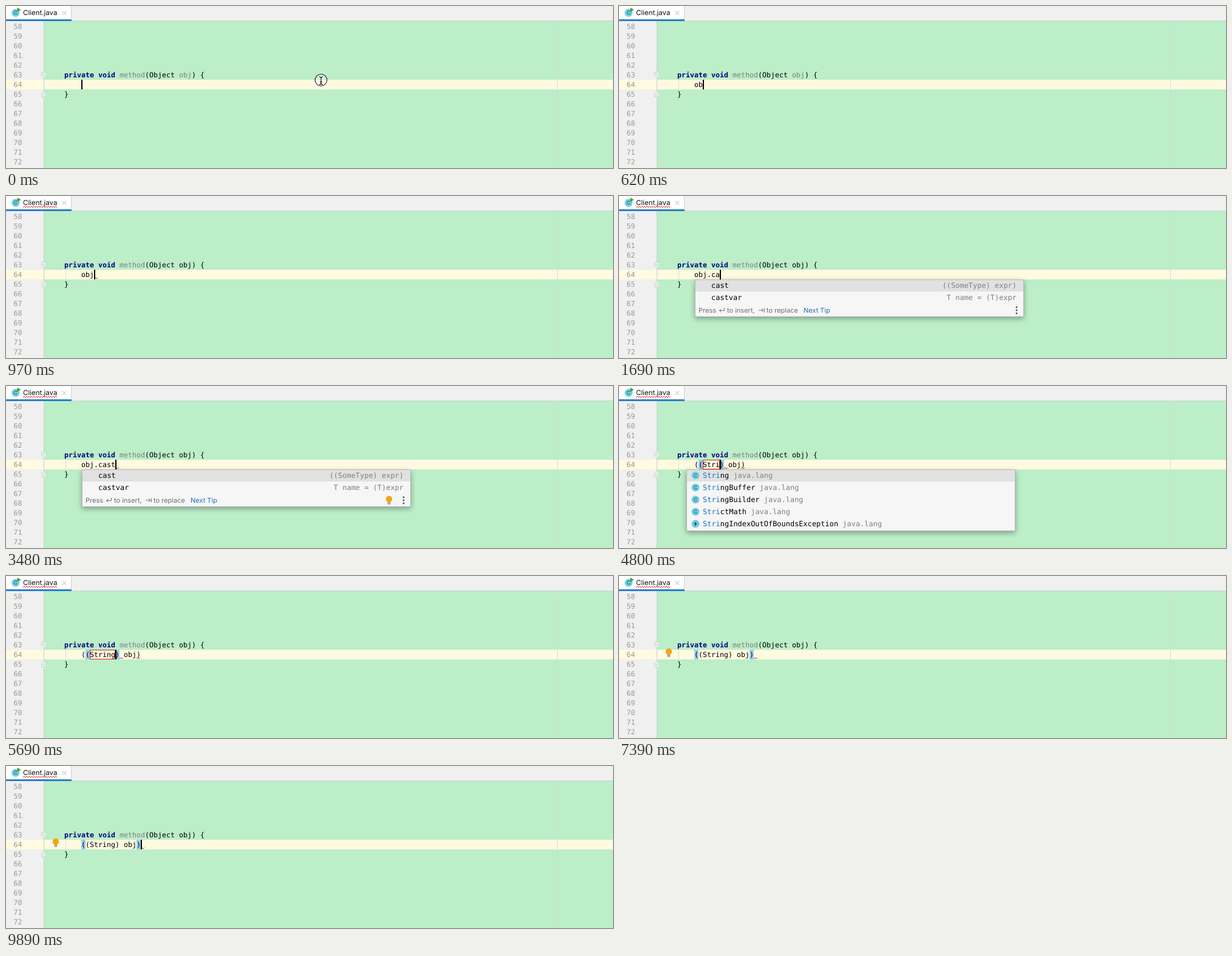
An HTML page for the animation above (9.99 s loop, 1000x268 px).

```html
<!DOCTYPE html>
<html lang="en">
<head>
<meta charset="utf-8">
<title>Cast completion</title>
<style>
html, body { margin: 0; width: 100%; height: 100%; overflow: hidden; background: #bceec8; }
svg { display: block; width: 1000px; height: 268px; }
text { white-space: pre; text-rendering: geometricPrecision; }
.code { font: 11.63px "DejaVu Sans Mono", monospace; }
.item { font: 11.96px "DejaVu Sans Mono", monospace; }
.ui { font-family: Inter, "Open Sans", sans-serif; }
.kw { font-weight: bold; fill: #000080; }
.dim { fill: #808080; }
.hit { fill: #1a6fc0; }
.wave { fill: none; stroke: #e0231c; stroke-width: 1; }
.popup { filter: drop-shadow(0 3px 4px rgba(0, 0, 0, .34)); }
</style>
</head>
<body>
<svg viewBox="0 0 1000 268" xmlns="http://www.w3.org/2000/svg">
  <g id="base"></g>
  <g id="live"></g>
</svg>
<script>
const LOOP = 9990, X0 = 124, CH = 7, TOP = 122, ROW = 16;
const col = c => X0 + c * CH;

const rect = (x, y, w, h, fill, more = '') =>
  `<rect x="${x}" y="${y}" width="${w}" height="${h}" fill="${fill}" ${more}/>`;
const text = (x, y, s, cls = 'code', more = '') =>
  `<text x="${x}" y="${y}" class="${cls}" ${more}>${s}</text>`;
const span = (cls, s) => `<tspan class="${cls}">${s}</tspan>`;
const path = (d, stroke, more = '') => `<path d="${d}" fill="none" stroke="${stroke}" ${more}/>`;

function wave(x, y, w) {
  let d = `M${x} ${y + 2}`;
  for (let i = 2, up = true; i <= w; i += 2, up = !up) d += `L${x + i} ${up ? y : y + 2}`;
  return `<path class="wave" d="${d}"/>`;
}

function bulb(x, y) {
  return `<circle cx="${x}" cy="${y - 1.5}" r="5.2" fill="#f4a50f"/>` +
    rect(x - 2.5, y + 2, 5, 2, '#f4a50f') +
    path(`M${x - 2.5} ${y + 4.7}h5M${x - 2.5} ${y + 6.6}h5`, '#6b6b6b');
}

// Round badge in front of a class, exception, method or parameter
function badge(kind, x, y) {
  const fill = { c: '#6fcfe6', e: '#6fcfe6', m: '#f4a6b0', p: '#f5b878' }[kind];
  const dot = `<circle cx="${x}" cy="${y}" r="6.5" fill="${fill}"/>`;
  if (kind === 'e')
    return dot + `<path d="M${x + 1.5} ${y - 4.5}l-4.5 5h2.5l-1 4 4.500-5h-2.500z" fill="#31434a"/>`;
  return dot + text(x, y + 3.1, kind === 'c' ? 'C' : kind, 'ui',
    'font-size="8.5" text-anchor="middle" fill="#31434a"');
}

function popup({ x, rows, hit = 0, tip, lamp, bar = 0 }) {
  const w = 542, h = rows.length * 20 + (tip ? 22 : 2), y = 138;
  let s = `<g class="popup">${rect(x, y, w, h, '#f6f6f6', 'rx="1.5"')}</g>` +
    rect(x + .5, y + .5, w - 1, h - 1, '#f6f6f6', 'stroke="#b9bcb9"') +
    rect(x + 1, y + 1, w - 2, 19, '#e1e1e1');
  rows.forEach((row, i) => {
    const [kind, name, tail = '', right = ''] = row.split('|'), cy = y + 10 + i * 20;
    if (kind) s += badge(kind, x + 15, cy);
    s += text(x + 27, cy + 4, span('hit', name.slice(0, hit)) + name.slice(hit) +
      span('dim', (kind === 'c' || kind === 'e' ? ' ' : '') + tail), 'item');
    s += text(x + 530, cy + 4, right, 'item dim', 'text-anchor="end"');
  });
  if (tip) {
    const b = y + h - 7, g = 'fill="#6e6e6e" font-size="11"';
    s += text(x + 6, b, 'Press', 'ui', g) + text(x + 53, b, 'to insert,', 'ui', g) +
      text(x + 118, b, 'to replace', 'ui', g) +
      text(x + 179, b, 'Next Tip', 'ui', 'fill="#1f6fb8" font-size="11"') +
      path(`M${x + 48.5} ${b - 8}v4.500h-8m3-3l-3 3 3 3` +
        `M${x + 105} ${b - 4}h8m-3-3l3 3-3 3M${x + 114.5} ${b - 7.5}v7`, '#6e6e6e');
    for (const d of [-5, 0, 5]) s += `<circle cx="${x + 530}" cy="${b - 4 + d}" r="1.5" fill="#555"/>`;
    if (lamp) s += bulb(x + 506, b - 4.5);
  }
  if (bar) s += rect(x + w - 9, 140, 7, 26, '#777', `rx="3.5" opacity="${bar}"`);
  return s;
}

function pointer([x, y]) {
  const beam = `M${x - 3} ${y - 5.5}q3 0 3 2.500v8q0 2.500-3 2.500M${x + 3} ${y - 5.5}q-3 0-3 2.500v8q0 2.500 3 2.500M${x - 2} ${y + 3}h4`;
  return `<circle cx="${x}" cy="${y}" r="9.8" fill="#fff" fill-opacity=".3" stroke="#222" stroke-width="1.1"/>` +
    path(beam, '#fff', 'stroke-width="2.6"') + path(beam, '#111', 'stroke-width="1.2"');
}

function drawBase() {
  let s = rect(0, 0, 1000, 25, '#f0f0f0') + rect(0, 24, 1000, 1, '#d2d2d2') +
    rect(0, 0, 107, 24, '#fff') + rect(107, 0, 1, 24, '#d2d2d2') + rect(0, 22, 108, 3, '#2b7fc9') +
    badge('c', 15.8, 11.3) + '<path d="M18.500 2.500l6 3.700-6 3.700z" fill="#4aa02c"/>' +
    text(28, 15.3, 'Client.java', 'ui', 'font-size="11.5" fill="#111"') +
    path('M92.500 8l7 7m0-7l-7 7', '#b4b4b4') +
    rect(0, 25, 62, 243, '#f0f0f0') + rect(63, 25, 937, 243, '#bceec8') +
    rect(0, TOP, 1000, ROW, '#fffae0') +
    rect(62, 25, 1, 243, '#cdd0cd') + rect(908, 25, 1, 243, '#d5dbd6');
  for (let n = 58; n < 73; n++)
    s += text(26.5, 38 + (n - 58) * ROW, n, 'code', 'text-anchor="end" fill="#999"');
  s += path('M58.500 109.500h8v6l-4 3.500-4-3.500z', '#c3dfc8', 'style="fill:#e3f0e5"') +
    path('M58.500 150.500h8v-6l-4-3.500-4 3.500z', '#c3dfc8', 'style="fill:#e3f0e5"') +
    path('M60.500 113.500h4M60.500 146.500h4', '#c3dfc8');
  return s + text(96, 150, '}');
}

function drawLive(s) {
  let out = text(96, 118, span('kw', 'private void') + ' ' + span('dim', 'method') +
    '(Object ' + (s.used ? 'obj' : span('dim', 'obj')) + ') {');
  if (s.tabErr) out += wave(28, 17, 56);
  if (s.line) out += rect(98, TOP, 1, ROW, '#dfe0cf');
  for (const c of s.hi) out += rect(col(c), TOP, CH, ROW, '#99d0f4');
  out += text(X0, 134, s.line);
  for (const c of s.waves) out += wave(col(c), 135, 6);
  if (s.box) out += rect(col(2) + .5, TOP + .5, Math.max(s.box * CH - 1, 1), 15, 'none', 'stroke="#e0231c"');
  if (s.bulb) out += bulb(82, 126.5);
  if (s.on) out += rect(col(s.at), TOP, 2, ROW, '#000');
  if (s.pop) out += popup(s.pop);
  if (s.mouse) out += pointer(s.mouse);
  return out;
}

const LANG = 'java.lang';
const cls = (...names) => names.map(n => `${/Exc/.test(n) ? 'e' : 'c'}|${n}|${LANG}`);
const strs = cls('String', 'StringBuffer', 'StringBuilder', 'StrictMath', 'StringIndexOutOfBoundsException');
const noMath = strs.filter(r => !r.includes('Math'));
const many = [...noMath, 'c|StringJoiner|java.util', 'c|StringTokenizer|java.util', 'c|StringReader|java.io'];
const sList = cls('String', 'System', 'Short', 'StringBuilder', 'StackTraceElement', 'SecurityException', 'StrictMath');
const objList = ['p|obj||Object', ...cls('Object', 'Override', 'OutOfMemoryError'), 'c|Objects|java.util',
  'c|Optional|java.util', 'c|Observer|java.util'];
const methods = ['m|equals|(Object obj)|boolean', 'm|hashCode|()|int', 'm|toString|()|String',
  'm|getClass|()|Class&lt;?&gt;', 'm|notify|()|void', 'm|notifyAll|()|void', 'm|wait|()|void'];
const casts = ['|cast||((SomeType) expr)', '|castvar||T name = (T)expr'];
const types = (rows, hit, bar) => ({ x: 111, rows, hit, bar });
const names = (rows, hit) => ({ x: 97, rows, hit });
const postfix = lamp => ({ x: 125, rows: casts, tip: true, lamp });

const typed = (line, more) => ({ line, at: line.length, waves: [], ...more });
const cast = (name, more) => {
  const n = name.length;
  return { line: `((${name}) obj)`, at: 2 + n, box: n || .3, hi: [1, 2 + n],
    waves: [3 + n, 7 + n], pop: null, ...more };
};

const start = { line: '', at: 0, on: true, hi: [], waves: [], mouse: [519, 122.5] };
const steps = [
  [0, {}],
  [90, { mouse: null }],
  [450, typed('o')],
  [540, typed('ob')],
  [630, { pop: names(objList, 1) }],
  [710, typed('obj', { pop: names(objList.slice(0, 3), 2) })],
  [800, { used: true }],
  [890, { pop: null, tabErr: true }],
  [970, { waves: [3] }],
  [1510, typed('obj.')],
  [1600, typed('obj.c', { pop: { x: 125, rows: methods } })],
  [1690, typed('obj.ca', { pop: postfix(false) })],
  [1780, typed('obj.cas', { waves: [7] })],
  [2050, typed('obj.cast', { waves: [8] })],
  [2590, { pop: postfix(true) }],
  [2950, { on: false }],
  [3480, { on: true }],
  [3660, { pop: null }],
  [3740, typed('obj')],
  [3830, cast('', { waves: [] })],
  [4010, { waves: [2, 8] }],
  [4280, cast('S')],
  [4370, { pop: types(sList, 1) }],
  [4460, cast('St', { pop: types(sList, 1) })],
  [4550, { pop: types(strs, 2) }],
  [4630, cast('Str', { pop: types(strs, 2) })],
  [4720, cast('Stri', { pop: types(strs, 3) })],
  [4800, { pop: types(strs, 4) }],
  [4890, cast('Strin', { pop: types(strs, 4) })],
  [4980, { pop: types(noMath, 5) }],
  [5070, cast('String', { pop: types(noMath, 5) })],
  [5160, { pop: types(many, 6, .4) }],
  [5430, { pop: types(many, 6, .2) }],
  [5520, { pop: types(many, 6) }],
  [5690, { pop: null }],
  [6050, { waves: [14] }],
  [6500, { at: 14, hi: [0, 13] }],
  [6860, { box: 0 }],
  [7390, { bulb: true, on: false }],
  [7930, { on: true }],
  [8380, { mouse: [530, 126] }],
  [8470, { mouse: [612, 164], on: false }],
  [8550, { mouse: [700, 214] }],
  [8640, { mouse: [763, 252] }],
  [8730, { mouse: null }],
  [8910, { on: true }],
  [9440, { on: false }],
  [9890, { on: true }]
];

let state = start;
const scenes = steps.map(([t, change]) => [t, drawLive(state = { ...state, ...change })]);

document.getElementById('base').innerHTML = drawBase();
const live = document.getElementById('live');
let shown = -1;

function show(now) {
  const t = now % LOOP;
  let i = scenes.length - 1;
  while (scenes[i][0] > t) i--;
  if (i !== shown) live.innerHTML = scenes[shown = i][1];
}

const begin = performance.now();
function tick() {
  show(performance.now() - begin);
  requestAnimationFrame(tick);
}
tick();
</script>
</body>
</html>
```
